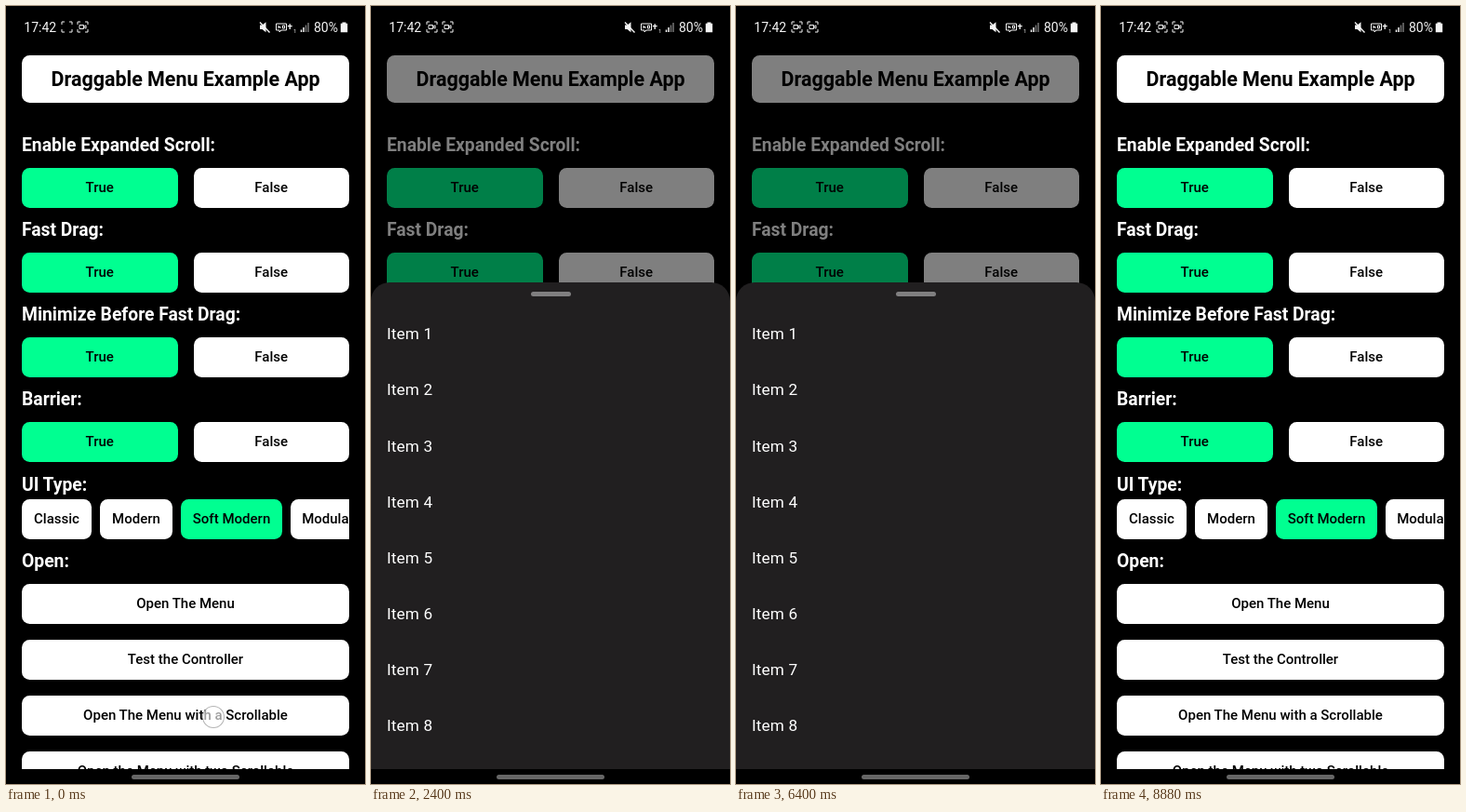
An HTML page that plays this animation: 386x836 px, repeating every 8960 ms.

```html
<!DOCTYPE html>
<html lang="en">
<head>
<meta charset="utf-8">
<title>Draggable menu</title>
<style>
  html, body { margin: 0; width: 100%; height: 100%; overflow: hidden; background: #000; }
  #stage { position: relative; width: 386px; height: 836px; overflow: hidden; background: #000; font-family: Roboto, sans-serif; }
  #stage div, #stage svg { position: absolute; }
  #app { left: 0; top: 0; width: 386px; height: 820px; overflow: hidden; }
  .box { display: flex; align-items: center; justify-content: center; border-radius: 8.5px; background: #fff; color: #000; font-size: 15px; font-weight: 500; white-space: nowrap; }
  .on { background: #00ff91; }
  .title { font-size: 21.44px; font-weight: 700; }
  .label { left: 17px; line-height: 24px; font-size: 19.3px; font-weight: 700; color: #fff; white-space: nowrap; }
  #chips { left: 17px; top: 530px; width: 352px; height: 43px; overflow: hidden; }
  #barrier { inset: 0; background: #000; }
  #menu { background: #211f20; overflow: hidden; }
  #grip { left: 50%; top: 10px; width: 43px; height: 5px; margin-left: -21.5px; border-radius: 3px; background: #807f80; }
  .item { left: 17px; line-height: 20px; font-size: 17.15px; letter-spacing: .16px; color: #fff; white-space: nowrap; }
  #touch { width: 0; height: 0; }
  #halo { left: -17.5px; top: -17.5px; width: 35px; height: 35px; border-radius: 50%; background: rgba(255,255,255,.36); }
  #dot { left: -12px; top: -12px; width: 24px; height: 24px; box-sizing: border-box; border-radius: 50%; background: rgba(255,255,255,.62); border: 1.5px solid rgba(130,130,130,.6); }
  #home { left: 135px; top: 826px; width: 116px; height: 5px; border-radius: 3px; background: #666; }
</style>
</head>
<body>
<div id="stage">
  <div id="app">
    <div id="page"><div id="chips"></div></div>
    <div id="barrier"></div>
    <div id="menu"><div id="grip"></div></div>
  </div>
  <svg width="386" height="40" viewBox="0 0 386 40" fill="none" stroke="#f4f4f4" font-family="Roboto, sans-serif" font-size="14">
    <defs>
      <path id="corners" d="M0 3V0H3M8 0H11V3M11 8V11H8M3 11H0V8"/>
      <path id="cam" d="M2 3.5H6.5V7.5H2ZM6.5 5.5L9 3.8V7.2Z"/>
    </defs>
    <g fill="#f4f4f4" stroke="none">
      <text x="19.3" y="28">17:42</text>
      <text x="331" y="28">80%</text>
      <path d="M361.5 17.5h4v1.3h1.7v9.4h-7.4v-9.4h1.7z"/>
      <path d="M273 20.5h2.5l4-3.2v11l-4-3.3H273z"/>
      <text x="302.5" y="26" font-size="10" font-weight="700">+</text>
      <text x="309" y="28.5" font-size="6">1</text>
    </g>
    <use href="#corners" x="60" y="17"/>
    <use id="blink" href="#cam" x="60" y="17"/>
    <use href="#corners" x="77" y="17"/>
    <use href="#cam" x="77" y="17"/>
    <path d="M273 17.5L283.5 28.5" stroke-width="1.4"/>
    <path d="M290.5 19H301.5V26H296L294 28V26H290.5ZM293 21V24M293 22.5H295V24M297.5 21V24H299.5V21Z"/>
    <path d="M317.5 25.5V28M320 23V28" stroke-width="1.5"/>
    <path d="M322.5 20.5V28M325 18V28" stroke="#777" stroke-width="1.5"/>
  </svg>
  <div id="home"></div>
  <div id="touch"><div id="halo"></div><div id="dot"></div></div>
</div>
<script>
const LOOP = 8960, STEP = 80;
const MINI = 576, MID = 297, FULL = 54;
const $ = id => document.getElementById(id);

function add(parent, cls, text, x, y, w, h) {
  const el = document.createElement('div');
  el.className = cls;
  el.textContent = text;
  const px = { left: x, top: y, width: w, height: h };
  for (const k in px) if (px[k] !== undefined) el.style[k] = px[k] + 'px';
  parent.append(el);
}

const page = $('page');
add(page, 'box title', 'Draggable Menu Example App', 17, 52.5, 352, 51.5);
['Enable Expanded Scroll:', 'Fast Drag:', 'Minimize Before Fast Drag:', 'Barrier:'].forEach((text, i) => {
  const y = 174 + 91 * i;
  add(page, 'label', text, 17, y - 36);
  add(page, 'box on', 'True', 17, y, 167.5, 42.5);
  add(page, 'box', 'False', 201.5, y, 167.5, 42.5);
});
add(page, 'label', 'UI Type:', 17, 502.5);
add(page, 'label', 'Open:', 17, 585);
[['Classic', 0, 75], ['Modern', 84, 78], ['Soft Modern', 171, 109], ['Modular', 289, 80]].forEach(([text, x, w]) =>
  add($('chips'), text === 'Soft Modern' ? 'box on' : 'box', text, x, 0, w, 42.5));
['Open The Menu', 'Test the Controller', 'Open The Menu with a Scrollable', 'Open the Menu with two Scrollable'].forEach((text, i) =>
  add(page, 'box', text, 17, 621 + 60 * i, 352, 42.5));
for (let i = 0; i < 13; i++) add($('menu'), 'item', 'Item ' + (i + 1), 17, 45.4 + 60.05 * i);

const linear = u => u;
const out = u => 1 - (1 - u) ** 2.2;

// [time, value, easing towards it]
const tops = [
  [160, 822], [480, MINI, out],
  [1440, MINI], [1600, 400], [1920, MID, out],
  [3200, MID], [3440, 62], [3520, FULL, out],
  [4880, FULL], [5040, 225], [5360, MID, out],
  [6720, MID], [6960, 470], [7280, MINI, out],
  [8400, MINI], [8480, 610], [8800, 822, out]
];
const shades = [[160, 0], [480, .5], [8480, .5], [8800, 0]];

// [press, release, x, y, end x, end y, held in place]
const touches = [
  [0, 0, 223, 764, 223, 764],
  [720, 1040, 262, 684, 300, 690, 1],
  [1440, 1600, 262, 735, 272, 560],
  [2560, 2880, 322, 655, 342, 665, 1],
  [3200, 3440, 264, 785, 275, 547],
  [4160, 4400, 340, 515, 359, 524, 1],
  [4880, 5040, 290, 397, 303, 568],
  [5760, 6000, 350, 535, 368, 545, 1],
  [6720, 6960, 280, 470, 292, 643],
  [7520, 7920, 262, 684, 275, 704, 1],
  [8400, 8560, 262, 640, 268, 715]
];
const camOn = [480, 1440, 2400, 3440, 4400, 5360, 6400, 7360, 8400];

function sample(table, t) {
  const i = table.findIndex(row => row[0] > t);
  if (i < 0) return table[table.length - 1][1];
  if (i === 0) return table[0][1];
  const [t0, a] = table[i - 1], [t1, b, ease = linear] = table[i];
  return a + (b - a) * ease((t - t0) / (t1 - t0));
}

function drawMenu(top) {
  const k = Math.min(1, Math.max(0, (MINI - top) / (MINI - MID)));
  const side = 17 * (1 - k);
  const bottom = Math.max(803, top + 227) * (1 - k) + 820 * k;
  const round = 17 + 3 * k;
  Object.assign($('menu').style, {
    left: side + 'px',
    top: top + 'px',
    width: 386 - 2 * side + 'px',
    height: bottom - top + 'px',
    borderRadius: `${round}px ${round}px ${side}px ${side}px`
  });
}

function drawTouch(t) {
  const fade = 88;
  const hit = touches.find(p => t >= p[0] && t < p[1] + fade);
  $('touch').style.display = hit ? '' : 'none';
  if (!hit) return;
  const [t0, t1, x0, y0, x1, y1, held] = hit;
  const u = t1 > t0 ? Math.min(1, (t - t0) / (t1 - t0)) : 1;
  $('touch').style.transform = `translate(${x0 + (x1 - x0) * u}px, ${y0 + (y1 - y0) * u}px)`;
  $('touch').style.opacity = t > t1 ? 1 - (t - t1) / fade : 1;
  $('halo').style.display = held && t < t1 ? '' : 'none';
}

function render(t) {
  drawMenu(sample(tops, t));
  drawTouch(t);
  $('barrier').style.opacity = sample(shades, t);
  $('blink').style.display = camOn.some(on => t >= on && t < on + 480) || t >= 8400 ? '' : 'none';
}

const start = performance.now();
function tick() {
  const t = (performance.now() - start) % LOOP;
  render(Math.floor(t / STEP) * STEP);
  requestAnimationFrame(tick);
}
tick();
</script>
</body>
</html>
```
